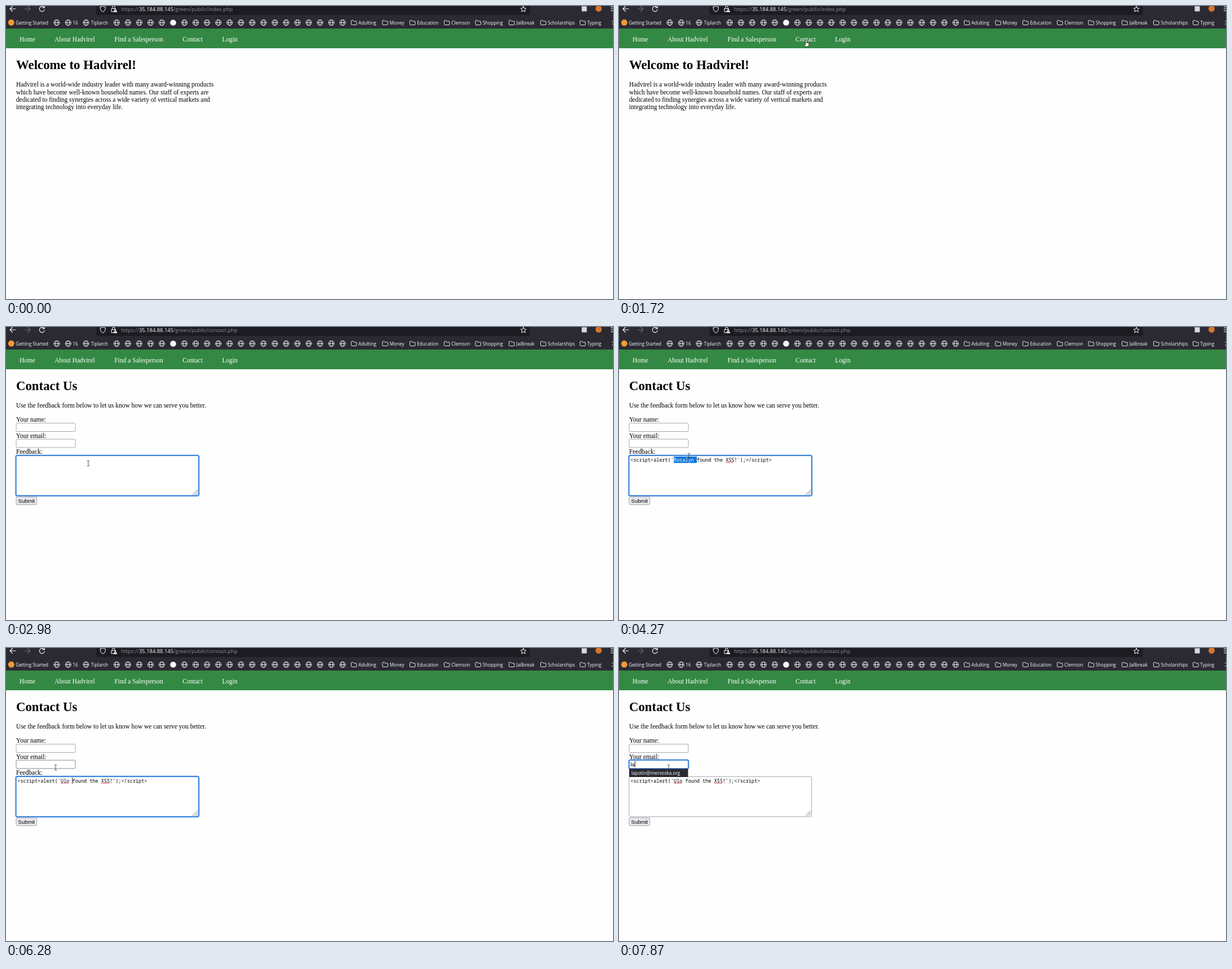
Write an HTML page with a canvas that moves like this. It is 1077 by 520 pixels and loops after 8 s.

```html
<!DOCTYPE html>
<html lang="en">
<head>
<meta charset="utf-8">
<title>Contact form</title>
<style>
html, body { margin: 0; width: 100%; height: 100%; overflow: hidden; background: #fefefe; }
canvas { display: block; }
</style>
</head>
<body>
<canvas id="stage" width="1077" height="520"></canvas>
<script>
const c = document.getElementById('stage').getContext('2d');
const LOOP = 8000, LOADED = 1780, TICK = 67.3;
const SERIF = '"Liberation Serif", serif';
const UI = '8.2px "Open Sans", sans-serif';
const URL_FONT = '9.38px "Open Sans", sans-serif';
const SANS = '9.52px "Liberation Sans", sans-serif';
const MONO = '8.53px "Noto Sans Mono", monospace';
const BODY = '11.43px ' + SERIF, HEAD = 'bold 22.86px ' + SERIF;
const LIGHT = '#fbfbfe', DIM = '#8f8e98', BAR = '#2b2a33', BLUE = '#1a6fd6';
const CHAR = 5.12, TEXT_X = 20.3;

function text(s, x, y, font, color = '#000') {
  c.font = font;
  c.fillStyle = color;
  c.fillText(s, x, y);
  return x + c.measureText(s).width;
}
function rect(x, y, w, h, color) {
  c.fillStyle = color;
  c.fillRect(x, y, w, h);
}
function box(x, y, w, h, r, fill, stroke, lw = 0.8) {
  c.beginPath();
  c.roundRect(x, y, w, h, r);
  if (fill) { c.fillStyle = fill; c.fill(); }
  if (stroke) { c.strokeStyle = stroke; c.lineWidth = lw; c.stroke(); }
}
function stroke(d, x, y, color = LIGHT, lw = 1, fill) {
  const p = new Path2D(d);
  c.save();
  c.translate(x, y);
  c.lineJoin = c.lineCap = 'round';
  if (fill) { c.fillStyle = fill; c.fill(p); }
  c.strokeStyle = color;
  c.lineWidth = lw;
  c.stroke(p);
  c.restore();
}
function dot(x, y, r, color) {
  c.beginPath();
  c.arc(x, y, r, 0, 7);
  c.fillStyle = color;
  c.fill();
}
function globe(x) {
  c.strokeStyle = LIGHT;
  c.lineWidth = 0.9;
  c.beginPath();
  c.arc(x, 29.5, 5, 0, 7);
  c.moveTo(x + 2.3, 29.5);
  c.ellipse(x, 29.5, 2.3, 5, 0, 0, 7);
  c.moveTo(x - 5, 29.5);
  c.lineTo(x + 5, 29.5);
  c.stroke();
}
const folder = x => stroke('M.5 1.5Q.5 .5 1.5 .5H4L5.2 2H9Q10 2 10 3V7.5Q10 8.5 9 8.5H1.5Q.5 8.5 .5 7.5Z', x, 25, LIGHT, 0.9);

function toolbar(t) {
  rect(0, 0, 1077, 40, BAR);
  box(160.5, -8, 769, 24, 3, '#1c1b22');
  stroke('M10 5H0M4.5 .5L0 5L4.5 9.5', 7, 0, LIGHT, 1.1);
  stroke('M0 5H10M5.5 .5L10 5L5.5 9.5', 33, 0, '#6b6a73', 1.1);
  const busy = t >= LOADED && t < 2515;
  stroke('M8.5 2.5A4.5 4.5 0 1 0 9.3 6M9.3 -.5V3H5.8', 59, 0, busy ? '#75747d' : LIGHT, 1.1);
  stroke('M0 1.3Q3 1 4.6 -.7Q6.2 1 9.2 1.3Q9.6 7.5 4.6 10Q-.4 7.5 0 1.3Z', 167.2, 0.5);
  stroke('M2 4V2.2A2.4 2.4 0 0 1 6.8 2.2V4M4 9.5H.5V4H8V5', 186.5, 0.5);
  stroke('M3 0L6 5.5H0Z', 191, 5, LIGHT, 0.7, LIGHT);
  rect(193.6, 7, 0.9, 2, BAR);
  stroke('M0 -5L1.5 -1.7L5 -1.4L2.4 1L3.2 4.6L0 2.7L-3.2 4.6L-2.4 1L-5 -1.4L-1.5 -1.7Z', 918, 5.5);
  rect(1021.5, 0.5, 9, 9, '#d9d9df');
  dot(1051.5, 4.5, 5.5, '#d9752c');
  for (const y of [1, 4.5, 8]) rect(1073, y, 4, 1, LIGHT);

  const page = t < LOADED ? 'index' : 'contact';
  let x = text('https://', 204, 9.3, URL_FONT, DIM);
  x = text('35.184.88.145', x, 9.3, URL_FONT, LIGHT);
  text('/green/public/' + page + '.php', x, 9.3, URL_FONT, DIM);

  dot(9.3, 29.3, 5.5, '#f09a35');
  text('Getting Started', 17.3, 32.5, UI, LIGHT);
  [90, 110.3, 142].forEach(globe);
  text('16', 118.3, 32.5, UI, LIGHT);
  text('Tiplarch', 150.8, 32.5, UI, LIGHT);
  for (let i = 0; i < 21; i++) {
    const gx = 196.3 + i * 20.05;
    if (i === 5) dot(gx, 29.5, 5.3, LIGHT);
    else globe(gx);
  }
  const folders = { Adulting: 612, Money: 667.5, Education: 716, Clemson: 777, Shopping: 832.5,
    Jailbreak: 892, Scholarships: 948, Typing: 1018 };
  for (const name in folders) {
    folder(folders[name]);
    text(name, folders[name] + 13.2, 32.5, UI, LIGHT);
  }
  stroke('M0 0L3 3L0 6', 1075.5, 26.5);
}

function nav() {
  rect(0, 40, 1077, 35, '#338943');
  const links = { 'Home': 24, 'About Hadvirel': 86.3, 'Find a Salesperson': 192.4, 'Contact': 313.3, 'Login': 383.4 };
  for (const name in links) text(name, links[name], 62.6, BODY, '#fff');
}

function home() {
  text('Welcome to Hadvirel!', 17.9, 112, HEAD);
  ['Hadvirel is a world-wide industry leader with many award-winning products',
    'which have become well-known household names. Our staff of experts are',
    'dedicated to finding synergies across a wide variety of vertical markets and',
    'integrating technology into everyday life.'
  ].forEach((s, i) => text(s, 17.9, 143.4 + i * 13.15, BODY));
}

function field(x, y, w, h, focus, hover) {
  if (focus) {
    box(x - 1.2, y - 1.2, w + 2.4, h + 2.4, 3.5, null, '#a9cbf3', 1.8);
    box(x, y, w, h, 2, '#fff', BLUE, 1.5);
  } else box(x, y, w, h, 2, '#fff', hover ? '#676774' : '#8f8f9d');
}
const caret = (x, y) => rect(x, y, 0.9, 11, '#000');
const at = i => TEXT_X + i * CHAR;

function squiggle(i, n) {
  c.beginPath();
  for (let x = 0; x <= n * CHAR; x += 1.3) c.lineTo(at(i) + x, 240.2 + (Math.round(x / 1.3) % 2 ? 0.7 : -0.7));
  c.strokeStyle = '#e0202c';
  c.lineWidth = 0.8;
  c.stroke();
}

// [start, end, caret column]
const carets = [[2520, 2980, 0], [3050, 3530, 49], [5070, 5280, 16], [5610, 6010, 18], [6145, 6680, 19]];

function feedback(t) {
  if (t >= 3050) {
    const name = t < 4930 ? 'Rosalyn ' : 'Ulo '.slice(0, t < 5280 ? 1 : t < 5410 ? 2 : t < 6010 ? 3 : 4);
    const pre = "<script>alert('", post = "found the XSS!');<\/script>";
    const selected = t >= 4010 && t < 4930;
    if (selected) rect(at(15), 230, 8 * CHAR, 11.3, '#0a74d6');
    text(pre, TEXT_X, 239, MONO);
    text(name, at(15), 239, MONO, selected ? '#fff' : '#000');
    text(post, at(15 + name.length), 239, MONO);
    squiggle(25 + name.length, 3);
    if (t >= 6010) squiggle(15, 3);
  }
  for (const [a, b, col] of carets) if (t >= a && t < b) caret(at(col) - 0.3, 230);
}

function email(t) {
  if (t < 6680) return;
  const typed = t < 7730 ? '' : t < 7870 ? 'l' : 'la';
  const end = text(typed, 20.5, 209.9, SANS);
  if (t < 7200 || t >= 7730) caret(end, 200.5);
  if (t >= 7800) {
    rect(18, 214.3, 104.5, 14.7, BAR);
    text('lapotin@mervoska.org', 22, 224.9, UI, LIGHT);
  }
}

function contact(t) {
  text('Contact Us', 17.9, 112, HEAD);
  text('Use the feedback form below to let us know how we can serve you better.', 17.9, 143.4, BODY);
  text('Your name:', 17.9, 168, BODY);
  text('Your email:', 17.9, 196.6, BODY);
  text('Feedback:', 17.9, 224.6, BODY);
  const inEmail = t >= 6680;
  field(18, 170.7, 105, 14.8, false);
  field(18, 199.1, 105, 14.8, inEmail, t >= 6270);
  field(17.8, 228.3, 324, 71, t >= 2520 && !inEmail);
  stroke('M0 9L9 0M3.2 9L9 3.2M6.4 9L9 6.4', 331, 288.5, '#66666c', 0.8);
  box(18, 301.3, 36.6, 14, 2, '#e9e9ed', '#8f8f9d');
  text('Submit', 21.6, 312, SANS);
  feedback(t);
  email(t);
}

// Pointer path: time, x, y
const path = [
  [260, 934, 488], [420, 800, 395], [620, 560, 235], [820, 400, 115], [1020, 338, 68], [1160, 351, 62],
  [1300, 336, 59], [1850, 331, 62], [2060, 220, 165], [2248, 140, 231], [2500, 146, 242],
  [3400, 146, 242], [3590, 120, 238], [3650, 124, 234], [3800, 124, 234], [3850, 112, 242],
  [4010, 112, 242], [4265, 124, 229], [6010, 124, 229], [6270, 88, 212], [8000, 88, 212]
];
function pointer(t) {
  if (t < 260) return;
  const q = Math.max(260, 1160 + Math.floor((t - 1160) / TICK + 1e-6) * TICK);
  const i = path.findIndex(k => k[0] > q);
  const [t0, x0, y0] = path[i - 1], [t1, x1, y1] = path[i];
  const k = (q - t0) / (t1 - t0);
  const x = Math.round(x0 + (x1 - x0) * k), y = Math.round(y0 + (y1 - y0) * k);
  if (t >= 2240) stroke('M-2 -4.5H-.6L0 -4L.6 -4.5H2M0 -4V4M-2 4.5H-.6L0 4L.6 4.5H2', x, y, '#333', 0.8);
  else if (t >= 1225 && t < 1850) stroke('M-1 0Q0 -1 1 0V4L4.5 5Q5.5 5.5 5 8L4 11H-1L-4 7Q-3.5 5.5 -1 7.5Z', x, y, '#000', 0.7, '#fff');
  else stroke('M0 0V9.5L2.2 7.5L3.7 10.8L5 10.2L3.6 7H6.7Z', x, y, '#000', 0.7, '#fff');
}

function draw(t) {
  rect(0, 0, 1077, 520, '#fefefe');
  toolbar(t);
  nav();
  if (t < LOADED) home();
  else contact(t);
  pointer(t);
}

const start = performance.now();
function tick() {
  draw((performance.now() - start) % LOOP);
  requestAnimationFrame(tick);
}
tick();
</script>
</body>
</html>
```
